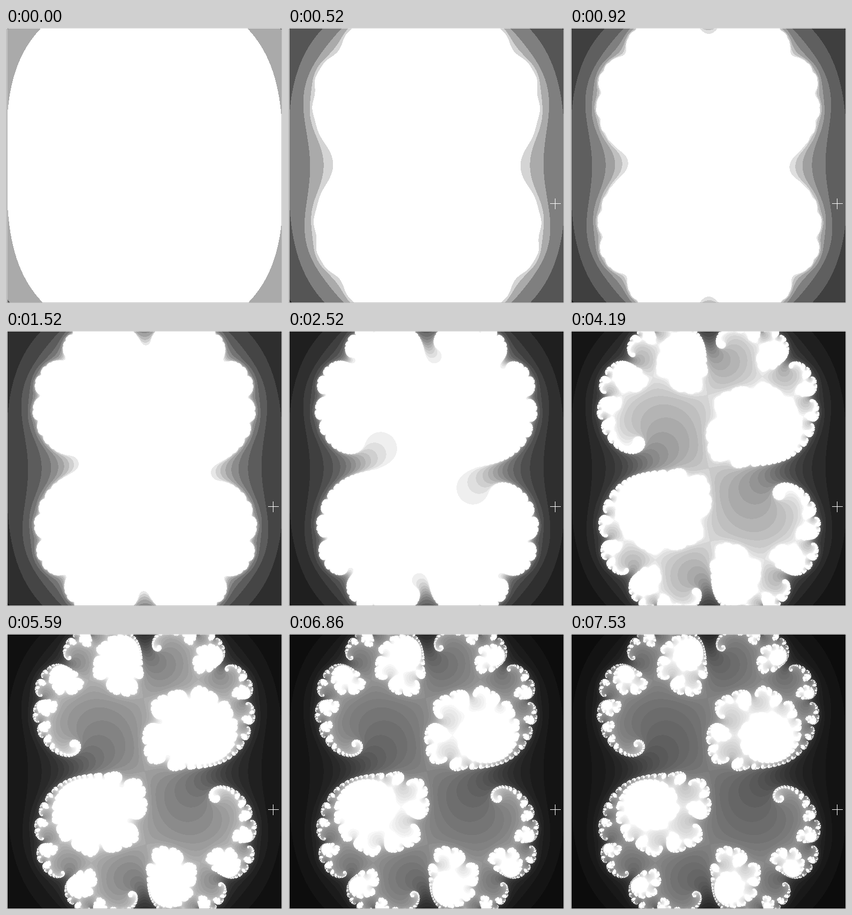
Animation, 516 px wide and 513 px high, one loop 8000 ms. Source, as an HTML page with a canvas:

```html
<!DOCTYPE html>
<html lang="en">
<head>
<meta charset="utf-8">
<title>Julia set, rising iteration limit</title>
<style>
html, body { margin: 0; width: 100%; height: 100%; overflow: hidden; background: #c0c0c0; }
canvas { display: block; width: 516px; height: 513px; }
</style>
</head>
<body>
<canvas id="stage" width="516" height="513"></canvas>
<script>
const ctx = document.getElementById('stage').getContext('2d');
const LOOP = 8000;
const LEFT = 3, TOP = 1, W = 512, H = 511;
const CX = 259, CY = 255.5, SCALE = 256;
const CR = 0.285, CI = 0.01, MAX = 40;

// The limit climbs by one every 200 ms, then in larger, slower steps.
const LATE = [[2930, 18], [3400, 20], [3790, 22], [4190, 24], [4590, 26], [5000, 28],
  [5590, 31], [6270, 34], [6860, 37], [7530, 40]];

function limitAt(t) {
  let n = t < 120 ? 3 : Math.min(16, 4 + Math.floor((t - 120) / 200));
  for (const [start, value] of LATE) if (t >= start) n = value;
  return n;
}

function escapeCount(x, y) {
  let n = 0;
  while (n < MAX && x * x + y * y <= 4) {
    const re = x * x - y * y + CR;
    y = 2 * x * y + CI;
    x = re;
    n++;
  }
  return n;
}

const counts = new Uint8Array(W * H);
for (let j = 0; j < H; j++) {
  for (let i = 0; i < W; i++) {
    counts[j * W + i] = escapeCount((i + LEFT - CX) / SCALE, (CY - j - TOP) / SCALE);
  }
}

const image = ctx.createImageData(W, H);
const pixels = new Uint32Array(image.data.buffer);

function rect(color, x, y, w, h) {
  ctx.fillStyle = color;
  ctx.fillRect(x, y, w, h);
}

function draw(limit) {
  const shades = Array.from({ length: MAX + 1 }, (_, k) => {
    const g = Math.floor(255 * Math.min(k, limit) / limit);
    return (0xff000000 | g << 16 | g << 8 | g) >>> 0;
  });
  for (let p = 0; p < counts.length; p++) pixels[p] = shades[counts[p]];
  ctx.putImageData(image, LEFT, TOP);
  rect('#fff', 490, 327, 20, 1);
  rect('#fff', 499, 318, 1, 20);
}

rect('#c0c0c0', 0, 0, 516, 513);
rect('#dcdcdc', 0, 0, 516, 1);

let shown = 0;
const begin = performance.now();

function tick(now) {
  const limit = limitAt(Math.max(0, now - begin) % LOOP);
  if (limit !== shown) draw(shown = limit);
  requestAnimationFrame(tick);
}
tick(begin);
</script>
</body>
</html>
```
